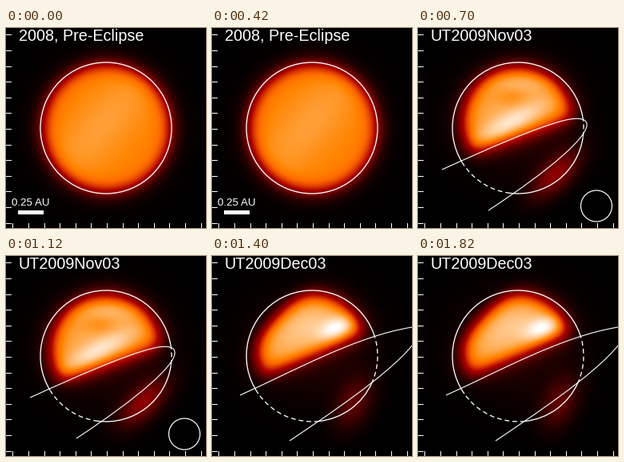
Recreate the animation shown at these times as a matplotlib script. Size 250 by 250 pixels, loop 2.1 s.

```python
import numpy as np
import matplotlib.pyplot as plt
from matplotlib.animation import ArtistAnimation
from matplotlib.colors import LinearSegmentedColormap
from matplotlib.patches import Arc, Circle, PathPatch, Rectangle
from matplotlib.path import Path

SIZE = 250
PX = 0.72  # points per pixel at 100 dpi
CX, CY, R = 125, 125, 82

heat = LinearSegmentedColormap("heat", {
    "red": [(0, 0, 0), (0.69, 1, 1), (1, 1, 1)],
    "green": [(0, 0, 0), (0.47, 0, 0), (1, 1, 1)],
    "blue": [(0, 0, 0), (0.745, 0, 0), (1, 1, 1)],
}, N=512)

fig = plt.figure(figsize=(2.5, 2.5), dpi=100, facecolor="black")
ax = fig.add_axes([0, 0, 1, 1])
ax.set_xlim(0, SIZE)
ax.set_ylim(SIZE, 0)
ax.axis("off")

X, Y = np.meshgrid(np.arange(SIZE) + 0.5, np.arange(SIZE) + 0.5)


def soft(d, width=6):
    """Smooth step: 1 where d is well below zero, 0 well above."""
    return 1 / (1 + np.exp(np.clip(d / width, -50, 50)))


def disk(x, y, r):
    return soft(np.hypot(X - x, Y - y) - r)


def above(x, y, slope):
    """Soft half plane above the line through (x, y)."""
    return soft((Y - y - slope * (X - x)) / np.hypot(1, slope))


def blob(x, y, sx, sy, tilt=0):
    a = np.radians(tilt)
    u = (X - x) * np.cos(a) + (Y - y) * np.sin(a)
    v = (Y - y) * np.cos(a) - (X - x) * np.sin(a)
    return np.exp(-0.5 * ((u / sx) ** 2 + (v / sy) ** 2))


def full_star():
    band = 0.06 * blob(122, 120, 70, 25, -48)
    return (0.74 + band) * disk(CX + 1, CY, R - 1) + 0.06 * blob(CX, CY, 60, 60)\
        * soft(R - np.hypot(X - CX, Y - CY))


def november():
    star = disk(125, 117, 70) * above(130, 137, -0.37)
    light = (0.74 + 0.13 * blob(112, 121, 36, 10, -28)
             + 0.06 * blob(130, 68, 35, 9) - 0.06 * blob(118, 86, 14, 9))
    stream = 0.36 * blob(172, 183, 27, 13, -45)
    return star * light + stream + 0.10 * blob(125, 115, 55, 50)


def december():
    star = (disk(124, 115, 69) * above(125, 126, -0.42)
            * (1 - above(72, 80, -1.05)))
    light = 0.76 + 0.2 * blob(158, 90, 18, 10, -22) + 0.04 * blob(115, 82, 28, 14, -30)
    stream = 0.24 * blob(177, 184, 24, 15, -65)
    return star * light + stream + 0.10 * blob(125, 110, 55, 48)


def picture(field):
    return ax.imshow(field, cmap=heat, vmin=0, vmax=1, zorder=0,
                     extent=(0, SIZE, SIZE, 0), interpolation="nearest")


def arc(start, end, dashed=False):
    style = (0, (4.5, 3)) if dashed else "-"
    return ax.add_patch(Arc((CX, CY), 2 * R, 2 * R, theta1=start, theta2=end,
                            color="white", lw=1.3 * PX, ls=style, zorder=2))


def ring(right, left):
    """Stellar outline, dashed over the two given angle ranges."""
    (a, b), (c, d) = right, left
    return [arc(a, b, True), arc(b, c), arc(c, d, True), arc(d, a + 360)]


def curve(*points):
    codes = [Path.MOVETO] + [Path.CURVE4] * (len(points) - 1)
    return ax.add_patch(PathPatch(Path(points, codes), fill=False, ec="white",
                                  lw=1.1 * PX, zorder=2))


def label(x, y, text, size=19.8):
    return ax.text(x, y, text, color="white", fontsize=size * PX,
                   family="Liberation Sans", va="baseline", zorder=3)


def title(text):
    return label(15.8, 15.6, text)


for p in 8.4 + 19.6 * np.arange(13):
    ax.plot([0, 6], [p, p], color="white", lw=PX, zorder=2)
    ax.plot([p, p], [244, 250], color="white", lw=PX, zorder=2)

before = [
    picture(full_star()),
    arc(0, 360),
    title("2008, Pre-Eclipse"),
    label(7, 222.5, "0.25 AU", 13.4),
    ax.add_patch(Rectangle((15, 228), 32, 5, color="white", lw=0)),
]

first = [
    picture(november()),
    *ring((-10, 8), (97, 148)),
    curve((30, 177), (85, 152), (150, 123), (185, 115),
          (203, 111), (212, 114), (211, 122),
          (209, 138), (170, 174), (88, 228)),
    ax.add_patch(Circle((223, 222.5), 19.5, fill=False, ec="white",
                        lw=1.2 * PX, zorder=2)),
    title("UT2009Nov03"),
]

second = [
    picture(december()),
    *ring((-20, 24), (84, 145)),
    curve((35, 174), (100, 145), (180, 100), (250, 89)),
    curve((97, 231), (140, 202), (219, 150), (250, 112)),
    title("UT2009Dec03"),
]

# Three still pictures with hard cuts
anim = ArtistAnimation(fig, [before, first, second], interval=700,
                       repeat=True, repeat_delay=0)
plt.show()
```
